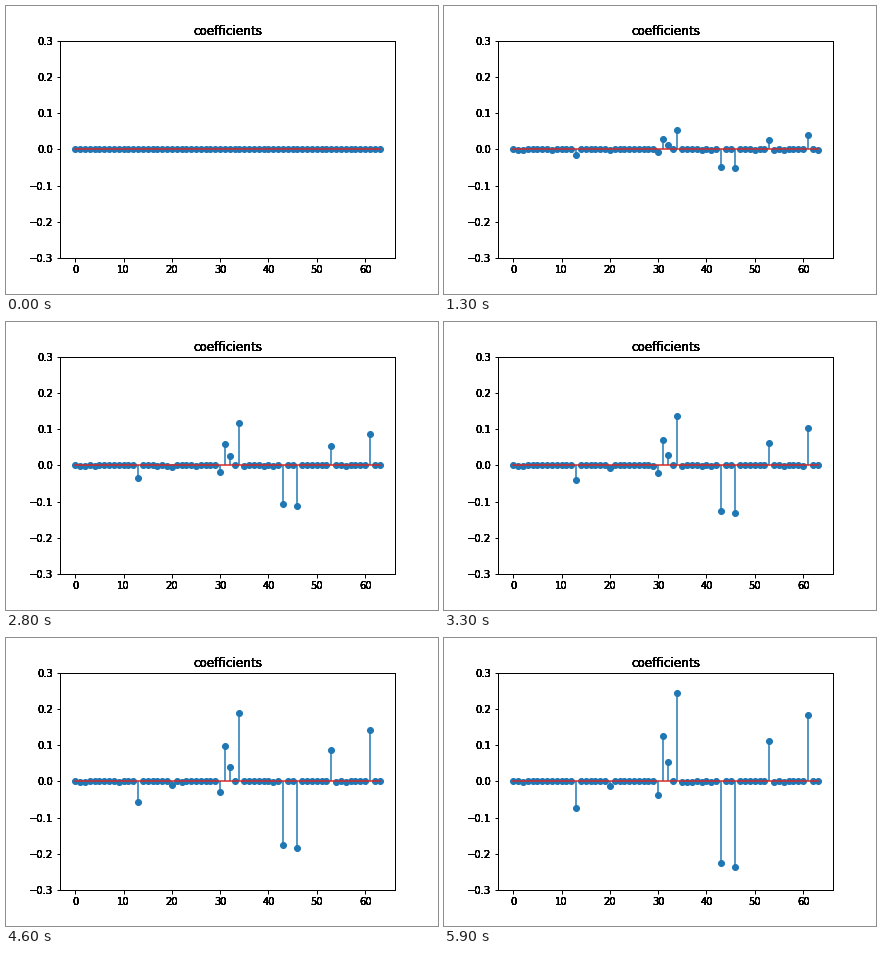
A matplotlib script that plays this animation: 432 px wide and 288 px high, repeating every 6 s.

```python
import numpy as np
import matplotlib.pyplot as plt
from matplotlib.animation import FuncAnimation

FRAMES, INTERVAL = 60, 100
N = 64
INK_PASSES = 8  # repeated text passes give the labels their hard, heavy edges

plt.rcParams["font.family"] = "DejaVu Sans"

# Final height of the coefficients that grow
PEAKS = {13: -0.0737, 20: -0.0125, 30: -0.038, 31: 0.125, 32: 0.052,
         34: 0.243, 43: -0.226, 46: -0.2355, 53: 0.111, 61: 0.182}
RESTLESS = [1, 2, 35, 39, 41, 54, 56]

x = np.arange(N)
final = np.zeros(N)
final[list(PEAKS)] = list(PEAKS.values())

# Chance for each near-zero coefficient to dip slightly in a frame
dip_chance = np.full(N, 0.08)
dip_chance[RESTLESS] = 0.55
dip_chance[[0] + list(PEAKS)] = 0


def heights(i):
    y = final * i / (FRAMES - 1)
    if i > 0:
        rng = np.random.default_rng(100 + i)
        y[rng.random(N) < dip_chance] = -0.003
    return y


fig = plt.figure(figsize=(6, 4), dpi=72, facecolor="white")
ax = fig.add_axes([0.125, 0.125, 0.775, 0.755])
ax.set_xlim(-3.15, 66.15)
ax.set_ylim(-0.3, 0.3)
ax.set_xticks(range(0, 61, 10))
ax.set_yticks(np.arange(-3, 4) / 10)
ax.tick_params(width=1, labelbottom=False, labelleft=False)
for spine in ax.spines.values():
    spine.set_linewidth(1)


def label(text, xy, coords, offset, ha, va, size=10):
    for _ in range(INK_PASSES):
        ax.annotate(text, xy, xycoords=coords, xytext=offset,
                    textcoords="offset points", ha=ha, va=va,
                    fontsize=size, annotation_clip=False)


label("coefficients", (0.5, 1), "axes fraction", (0, 6),
      "center", "baseline", 12)
for t in range(0, 61, 10):
    label(str(t), (t, 0), ax.get_xaxis_transform(), (0, -7), "center", "top")
for t in range(-3, 4):
    text = f"{t / 10:.1f}".replace("-", "\u2212")
    label(text, (0, t / 10), ax.get_yaxis_transform(), (-7, 0),
          "right", "center_baseline")

stems = ax.vlines(x, 0, np.zeros(N), colors="C0", linewidth=1.5, zorder=2)
dots, = ax.plot(x, np.zeros(N), "C0o", markersize=6, zorder=2.1)
ax.plot([0, N - 1], [0, 0], "C3-", linewidth=1.5, zorder=2.2)


def update(i):
    y = heights(i)
    stems.set_segments([[(k, 0), (k, v)] for k, v in zip(x, y)])
    dots.set_ydata(y)
    return stems, dots


anim = FuncAnimation(fig, update, frames=FRAMES, interval=INTERVAL,
                     repeat=True, repeat_delay=0)
plt.show()
```
